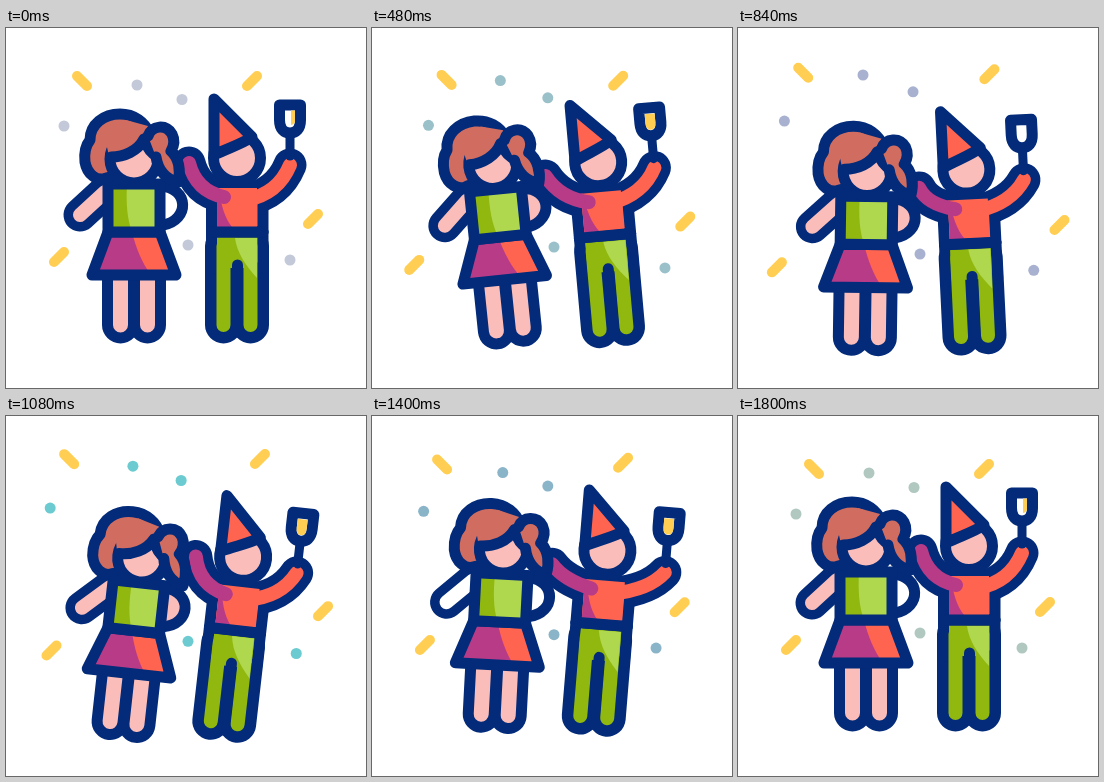
An HTML page for the animation above (1.84 s loop, 360 by 360 pixels).

```html
<!DOCTYPE html>
<html lang="en">
<head>
<meta charset="utf-8">
<title>Party</title>
<style>
  html, body { margin: 0; height: 100%; overflow: hidden; background: #fff; }
  svg { display: block; width: 100vw; height: 100vh; fill: none; stroke-linecap: round; stroke-linejoin: round; }
  .ink { stroke: #032b79; stroke-width: 11; }
  .limb { stroke: #032b79; stroke-width: 33; }
  .leg { stroke: #032b79; stroke-width: 37; }
  .skin { fill: #fbbdb9; }
  .hair { fill: #d16d60; }
  .red { fill: #ff6450; }
  .plum { fill: #b83b88; }
  .green { fill: #91b80f; }
  .lime { fill: #b0d84e; }
  .in { fill: none; stroke-width: 14; }
  .skin.in { stroke: #fbbdb9; }
  .red.in { stroke: #ff6450; }
  .plum.in { stroke: #b83b88; }
  .green.in { stroke: #91b80f; }
  .in { fill: none !important; }
</style>
</head>
<body>
<svg viewBox="0 0 360 360">
  <g id="confetti"></g>

  <g id="man">
    <path class="limb armL"/><path class="limb armR"/>
    <path class="leg" d="M217.500 218V297M244.500 218V297"/>
    <path class="ink red" d="M205.500 168V204H257V168Z"/>
    <path class="ink green" d="M205.500 204V240H257V204Z"/>
    <path class="in red armR"/>
    <path class="red" d="M211 160H251V199H211Z"/>
    <path class="in plum armL"/>
    <path class="plum" d="M207 160H213C215 178 219 190 226 199H211V168Z"/>
    <path class="in green" d="M217.500 218V297M244.500 218V297"/>
    <path class="green" d="M211 210H251V240H211Z"/>
    <path class="lime" d="M229 210H251V250C240 238 231 225 229 210Z"/>
    <path class="ink" d="M231.500 237V304" stroke-width="12"/>
    <path class="ink" d="M205.500 204H257"/>
    <circle class="ink skin" cx="231" cy="130" r="23.500"/>
    <path class="ink red" d="M208 71L246 109C236 116 222 120 208 127Z"/>
    <g id="glass">
      <path class="ink" d="M284 105V128" style="stroke-width:9"/>
      <path class="ink" fill="#fff" d="M273.500 77H294.500V92C294.500 101 290 105 284 105S273.500 101 273.500 92Z"/>
      <path id="drink" fill="#ffce52"/>
    </g>
  </g>

  <g id="woman">
    <path id="back" class="ink" d="M155 158C183 160 184 192 157 197"/>
    <path class="limb" d="M99 164L74 187"/>
    <path id="arm" class="in skin" d="M99 164L74 187"/>
    <path class="leg" d="M114.500 250V297M141.500 250V297"/>
    <path class="in skin" d="M114.500 250V297M141.500 250V297" style="stroke-width:15"/>
    <path class="red" d="M102 204H154L170 247H86Z"/>
    <path class="plum" d="M102 204H126C130 220 136 235 145 247H86Z"/>
    <path class="ink" d="M102 204H154L170 247H86Z"/>
    <path class="lime" d="M102 156H154V204H102Z"/>
    <path class="green" d="M102 156H121C120 175 121 190 126 204H102Z"/>
    <path class="ink" d="M102 156H154V204H102Z"/>
    <path class="ink hair" d="M100 150C91 154 81 146 79 134C78 125 80 117 84 112C84 96 98 86 114 86C128 86 139 94 144 106L140 140Z"/>
    <circle class="ink skin" cx="128" cy="131" r="24"/>
    <path class="hair" d="M103 128C118 130 132 123 138 111L142 98L120 92L98 106Z"/>
    <path class="ink" d="M105 129C118 129 132 123 138 111C141 120 146 126 152 129"/>
    <path class="ink hair" d="M142 108C146 97 160 96 166 106C169 112 168 118 165 123C173 130 175 143 172 154C160 152 152 142 150 129"/>
  </g>
</svg>
<script>
const LOOP = 1840, STEP = 40;
const times = [0, 320, 640, 840, 1080, 1400, 1800];
const $ = id => document.getElementById(id);

// Kind, x, y, full travel, then peak time and half width of its drift
const bits = [
  ["\\", 76, 53, -13, -10, 1030, 700],
  ["/", 246, 53, 8, -10, 1110, 700],
  ["/", 53, 229, -15, 11, 730, 700],
  ["/", 307, 191, 14.5, 6, 835, 655],
  ["o", 131, 57, -6, -10, 830, 655],
  ["o", 176, 71.5, -1, -8, 930, 650],
  ["o", 58, 98, -14, -6, 1030, 700],
  ["o", 182, 217, 0, 9.5, 930, 650],
  ["o", 284, 232, 12.5, 11, 730, 700]
];
const shapes = { "\\": "M-5-5L5 5", "/": "M-5 5L5-5", o: "M0 0h.01" };
const nodes = bits.map(([kind]) => {
  const p = document.createElementNS("http://www.w3.org/2000/svg", "path");
  p.setAttribute("d", shapes[kind]);
  p.setAttribute("stroke", "#ffce52");
  p.setAttribute("stroke-width", kind === "o" ? 11 : 10);
  $("confetti").append(p);
  return p;
});

const dotColors = [
  [195, 201, 216], [107, 203, 208], [200, 182, 196], [168, 178, 208],
  [107, 203, 208], [138, 180, 200], [176, 200, 192]
];

const segment = t => {
  let i = 0;
  while (i < times.length - 2 && t >= times[i + 1]) i++;
  return [i, Math.min(1, (t - times[i]) / (times[i + 1] - times[i]))];
};

// Smooth curve through the poses, at rest at both ends of the loop
function key(t, v) {
  const [i, u] = segment(t), h = times[i + 1] - times[i];
  const slope = k => k && k < v.length - 1 ? (v[k + 1] - v[k - 1]) / (times[k + 1] - times[k - 1]) : 0;
  const w = u * u * (3 - 2 * u);
  return v[i] * (1 - w) + v[i + 1] * w
    + h * u * (1 - u) * ((1 - u) * slope(i) - u * slope(i + 1));
}

function dotColor(t) {
  const [i, u] = segment(t);
  return `rgb(${dotColors[i].map((c, k) => Math.round(c + (dotColors[i + 1][k] - c) * u))})`;
}

const place = (el, value) => el.setAttribute("transform", value);
const setPath = (cls, d) => document.querySelectorAll("." + cls).forEach(el => el.setAttribute("d", d));
const between = (t, a, b) => t >= a && t < b;

function draw(t) {
  const color = dotColor(t);
  bits.forEach(([kind, x, y, dx, dy, peak, half], i) => {
    const d = Math.min(1, Math.abs(t - peak) / half);
    const p = (1 + Math.cos(Math.PI * d)) / 2;
    place(nodes[i], `translate(${x + dx * p} ${y + dy * p})`);
    if (kind === "o") nodes[i].setAttribute("stroke", color);
  });

  const wx = key(t, [0, 1, 1.5, 0, -1.5, -1, 0]);
  const wy = key(t, [0, 0.5, 10, 12.5, 10.5, 2, 0]);
  const wr = key(t, [0, -3.8, -6.5, 0.8, 6.3, 3, 0]);
  place($("woman"), `translate(${wx} ${wy}) rotate(${wr} 128 215)`);

  const my = key(t, [0, 1.5, 7, 11.5, 10.5, 4.5, 0]);
  const mr = key(t, [0, -2.4, -7, -2.8, 6.5, 4.7, 0]);
  place($("man"), `translate(0 ${my}) rotate(${mr} 231 184)`);

  const lx = 183 + key(t, [0, -3, -7, 0, 1, -6, 0]);
  const ly = 135 + key(t, [0, -1, 10, 11, 0, 13, 0]);
  const gx = key(t, [0, 0, 5, 4, 2, 6, 0]);
  const gy = key(t, [0, 0, 7, 6, 3, 10, 0]);
  setPath("armL", `M${lx} ${ly}Q190 163 218 169`);
  setPath("armR", `M240 172Q${272 + gx / 2} 166 ${284 + gx} ${137 + gy}`);
  place($("glass"), `translate(${gx} ${gy})`);

  const resting = t < 200 || t >= 1640;
  const empty = between(t, 200, 480) || between(t, 740, 960);
  $("drink").setAttribute("d", empty ? "" : resting
    ? "M285 82.500H289V93Q289 96 285 97Z"
    : "M279 83H289V92Q289 99 284 99T279 92Z");
  $("arm").style.stroke = between(t, 1320, 1500) ? "#fff" : "";
  $("back").style.fill = between(t, 240, 1280) ? "#fbbdb9" : "#fff";
}

function tick() {
  const t = performance.now() % LOOP;
  draw(Math.floor(t / STEP) * STEP);
  requestAnimationFrame(tick);
}
tick();
</script>
</body>
</html>
```
